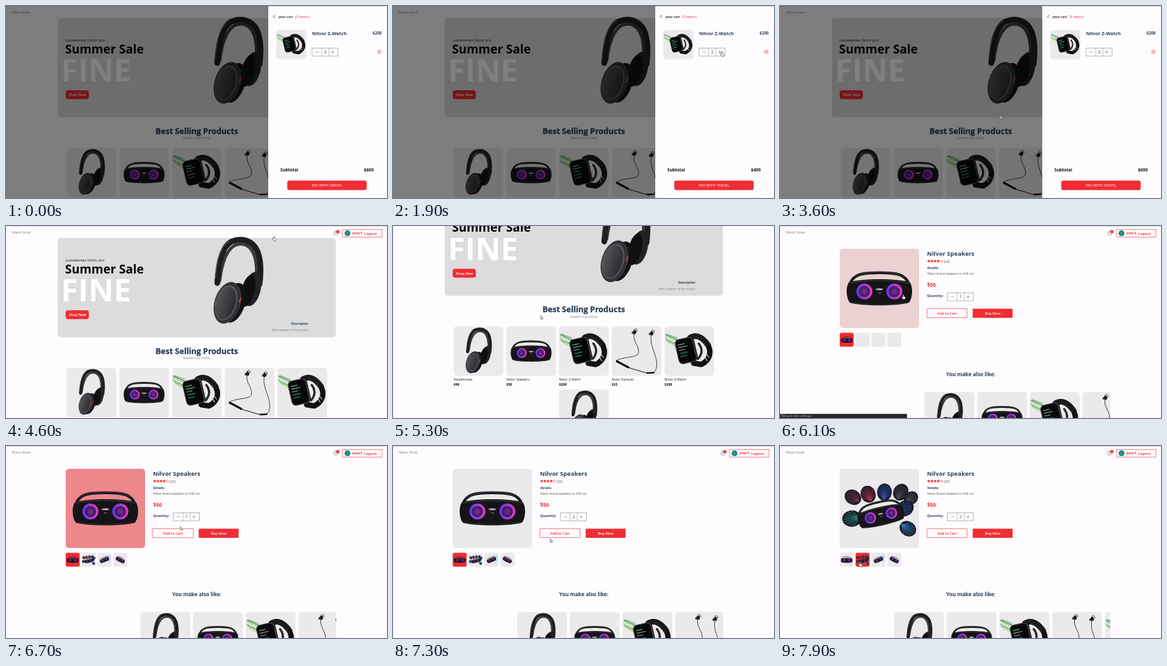
These frames come from a looping animation (600x303 px, 8000 ms). An HTML page:

```html
<!DOCTYPE html>
<html lang="en">
<head>
<meta charset="utf-8">
<title>Shop walkthrough</title>
<style>
html, body { margin: 0; width: 100%; height: 100%; overflow: hidden; background: #fefcfe; }
svg { display: block; width: 100vw; height: 100vh; font-family: "Open Sans", "Noto Sans", sans-serif; }
</style>
</head>
<body>
<svg id="stage" viewBox="0 0 600 303"></svg>
<script>
const LOOP = 8000;
const RED = '#f02d34', NAVY = '#2b4159', CARD = '#ebe9eb', PAGE = '#fefcfe';
const BRAND = 'Nilvor';

// ---- markup helpers ----
const text = (x, y, size, str, o = {}) =>
  `<text x="${x}" y="${y}" font-size="${size}" fill="${o.fill || '#111'}" font-weight="${o.w || 400}"` +
  ` text-anchor="${o.a || 'start'}"${o.id ? ` id="${o.id}"` : ''} ${o.extra || ''}>${str}</text>`;
const rect = (x, y, w, h, r, fill, extra = '') =>
  `<rect x="${x}" y="${y}" width="${w}" height="${h}" rx="${r}" fill="${fill}" ${extra}/>`;
const line = (d, stroke, w, extra = '') =>
  `<path d="${d}" fill="none" stroke="${stroke}" stroke-width="${w}" stroke-linecap="round" stroke-linejoin="round" ${extra}/>`;
const oval = (x, y, rx, ry, fill, extra = '') =>
  `<ellipse cx="${x}" cy="${y}" rx="${rx}" ry="${ry}" fill="${fill}" ${extra}/>`;
const leaning = (x, y, rx, ry, angle, fill) => oval(x, y, rx, ry, fill, `transform="rotate(${angle} ${x} ${y})"`);
const pic = (name, x, y, size, extra = '') =>
  `<use href="#${name}" x="${x}" y="${y}" width="${size}" height="${size}" ${extra}/>`;
const symbol = (id, body) => `<symbol id="${id}" viewBox="0 0 78 78">${body}</symbol>`;

// ---- product pictures, each on a 78 unit square ----
const headphones =
  line('M24 38C26 22 30 12 37 8.5C44 6 50 9 53 18C55 25 55 32 54 40', '#3b3b3f', 2.6) +
  line('M22 40C23 20 27 9 34 5.5C43 2 51 5 55 13C58 20 58.5 30 57 41', '#1e1e21', 4.8) +
  line('M20.4 36C21.5 20 25 9 32 5', '#5f5f64', .6) +
  leaning(51, 45, 7, 14.5, 13, '#232326') +
  leaning(47.5, 46.5, 5.5, 13.5, 14, '#0f0f11') +
  leaning(36, 56.5, 9, 17, 17, '#121214') +
  leaning(30.5, 56.5, 10.8, 17.8, 17, '#323236') +
  leaning(29.3, 56.5, 8.8, 15, 17, '#5a5a5f') +
  leaning(29, 56.7, 8, 14, 17, 'url(#cup)') +
  line('M40.5 56L41.4 52.5', '#d8423f', 1);

const ring = (x, y) =>
  oval(x, y, 8.2, 8.2, '#241436') +
  oval(x, y, 6.6, 6.6, 'none', 'stroke="url(#glow)" stroke-width="2.4"') +
  oval(x, y, 4.8, 4.8, '#4d1f70') + oval(x, y, 2.7, 2.7, '#6d2a8a');

const speakerBody =
  line('M10 35C13 25 22 23.5 39 23.5S65 25 68 35', '#1b1b1f', 2.8) +
  line('M15 27.5C21 24 28 22.8 39 22.8S57 24 63 27.5', '#4a4a50', .5) +
  '<path d="M9 33C20 29 58 29 69 33C72 37 72 48 68 53C58 56.5 20 56.5 10 53C6 48 6 37 9 33Z" fill="#151518"/>' +
  line('M10 33.8C22 30.5 56 30.5 68 33.8', '#44444a', .7) +
  line('M12 52.6C24 55.4 54 55.4 66 52.6', '#34343a', .6) +
  ring(24.3, 42) + ring(53.7, 42) +
  oval(39, 39.8, 3.8, 1, '#b0b0b5') + rect(37.5, 43, 3, .8, .3, '#77777c');

const watch =
  ['M2 13L20 21', 'M2 16L19 23', 'M1 19L18 27', 'M3 22L19 29', 'M4 12L20 18', 'M6 25L18 32']
    .map((d, i) => line(d, i % 2 ? '#72c044' : '#2b8a3c', i % 3 ? .8 : 1.4, `stroke-dasharray="${4 + i} 1.2"`)).join('') +
  line('M40 18C50 11 61 18 69 30', '#1a1a1d', 9) +
  line('M48 17C57 17 63 25 68 33', '#37373c', .8) +
  line('M70 33C74 43 70 54 58 60L46 58', '#121214', 8.5) +
  line('M54 27C60 35 60 43 53 51', '#29292d', 3.5) +
  '<g transform="rotate(-13 34 38)">' +
  rect(19, 18, 31, 40, 7, '#232327') + rect(19.6, 18.6, 28, 38.8, 6.5, '#08080a', 'stroke="#77777d" stroke-width=".6"') +
  rect(23, 26, 11, 1.5, .5, '#41a861') + rect(23, 30.5, 15, 1.1, .5, '#9aa59d') +
  rect(23, 35, 10, 1.1, .5, '#9aa59d') + rect(23, 39.5, 13, 2.4, 1, '#19613a') + rect(23, 45, 11, 1.2, .5, '#41a861') +
  '</g>' + line('M64 49L67 54M67 45L70 49', '#dadadd', 1.2);

const bud = (x, y) =>
  oval(x, y, 2.6, 3.2, '#17171a') + oval(x - 3, y + 1, 1.7, 2, '#36363b') +
  line(`M${x - 1} ${y - 2}C${x - 1} ${y - 7} ${x + 5} ${y - 6} ${x + 4} ${y - 1}`, '#222226', .9);
const earbuds =
  line('M35 12C33 24 44 31 42 42C40 50 18 47 7 54', '#26262a', .9) +
  line('M62 14C60 28 66 36 69 48C72 60 72 67 66 73', '#26262a', .9) +
  line('M7 54C17 57 20 63 32 67C46 70 56 76 66 73', '#1a1a1d', 1.1) +
  line('M8 55L26 64.5', '#151518', 3.2) + line('M56 73.5L66 73', '#151518', 2.6) +
  bud(36, 9) + bud(63, 11);

const wing = (x, y, r, angle, color) => {
  let ribs = '';
  for (let i = -4; i <= 4; i++) {
    const a = i * .29;
    ribs += line(`M0 ${r * .85}L${(Math.sin(a) * r * .9).toFixed(1)} ${(r * .6 - Math.cos(a) * r * 1.4).toFixed(1)}`,
      color, .6, 'stroke-dasharray="1.5 .6"');
  }
  return `<g transform="translate(${x} ${y}) rotate(${angle})">${oval(0, 0, r * .85, r, '#1b1b25')}${ribs}</g>`;
};
const party =
  wing(70, 29, 7.5, 50, '#55555f') + wing(60, 23, 8.5, 28, '#4b4b58') +
  wing(13, 28, 8.5, -55, '#7c3151') + wing(28, 25, 8.5, -22, '#bd3152') +
  wing(44, 23, 8.5, 3, '#3458c8') + wing(64, 39, 9, 60, '#2f54b0') +
  wing(12, 49, 9.5, -95, '#27998f') + wing(67, 59, 8.5, 125, '#3185c7') +
  '<g transform="translate(40.5 46) rotate(-13) scale(.72) translate(-39 -42)">' + speakerBody + '</g>';
const tilted = angle =>
  `<g transform="rotate(${angle} 39 40) translate(7 6) scale(.82)">${speakerBody}</g>`;
const smoke = oval(60, 24, 13, 8, '#9dcbe4') + oval(65, 38, 8, 12, '#b8d9eb') + tilted(-22);

// ---- shared interface parts ----
const qtyBox = (x, y, id) =>
  rect(x, y, 41, 12.5, 0, 'none', 'stroke="#85858b" stroke-width=".6"') +
  line(`M${x + 15} ${y}v12.5M${x + 26.5} ${y}v12.5`, '#85858b', .5) +
  line(`M${x + 6} ${y + 6.2}h4`, '#777', .6) +
  line(`M${x + 30.5} ${y + 6.2}h4M${x + 32.5} ${y + 4.2}v4`, '#777', .6) +
  text(x + 20.7, y + 8.6, 6.2, '1', { a: 'middle', fill: '#444', id });
const topLine = (x, w) => rect(x, 0, w, .8, 0, '#cfcdcf');
const header =
  topLine(0, 600) + text(9, 11.5, 5.4, BRAND + ' Store', { fill: '#777' }) +
  rect(516.7, 9.5, 5, 4.5, .6, 'none', 'stroke="#666" stroke-width=".6"') + line('M518 9.5V8q1.2-1.6 2.4 0v1.5', '#666', .5) +
  oval(522.7, 9, 2.7, 2.7, RED) + text(522.7, 10.5, 4, '3', { a: 'middle', fill: '#fff' }) +
  rect(530, 5.3, 62, 12, 0, PAGE, `stroke="${RED}" stroke-width=".6"`) +
  oval(537.8, 11.4, 4.6, 4.6, '#138a80') + text(537.8, 13.2, 4.6, 'J', { a: 'middle', fill: '#fff' }) +
  text(545.5, 13, 4.4, 'Jonas E', { fill: RED, w: 700 }) +
  text(564, 13.8, 6, 'Logout', { fill: RED, w: 600 });

const goods = [
  ['headphones', 'Headphones', 99], ['speaker', BRAND + ' Speakers', 50], ['watch', BRAND + ' Z-Watch', 200],
  ['earbuds', BRAND + ' Earbuds', 33], ['watch', BRAND + ' Z-Watch', 200]];
const tile = (name, x, y) => rect(x, y, 78.3, 78, 5, CARD) + pic(name, x, y, 78);
const product = ([name, label, price], x, y, id = '') =>
  `<g ${id && `id="${id}"`}>` + tile(name, x, y) +
  text(x, y + 85, 5, label, { fill: '#222' }) + text(x, y + 93.5, 5.2, '$' + price, { w: 700, fill: '#000' }) + '</g>';

const home =
  header +
  rect(81.5, 19, 438, 156.5, 5, '#dcdcdc') +
  text(93.5, 55.5, 5.9, 'Lumetteries Ostric pro') +
  text(93, 74.5, 19, 'Summer Sale', { w: 700, fill: '#000' }) +
  text(86.6, 119, 49, 'FINE', { w: 700, fill: '#fff' }) +
  rect(94, 133, 36.5, 14, 4, RED) + text(112.3, 142, 5.6, 'Shop Now', { a: 'middle', w: 600, fill: '#fff' }) +
  pic('headphones', 291, 14, 148) +
  text(476, 156, 4.7, 'Description', { a: 'end', w: 700, fill: NAVY }) +
  text(476, 166, 4.6, 'Best headset on the market', { a: 'end', w: 300, fill: '#555' }) +
  text(300.5, 201.5, 12.5, 'Best Selling Products', { a: 'middle', w: 700, fill: NAVY, extra: `stroke="${NAVY}" stroke-width=".3"` }) +
  text(300.5, 210.3, 4.6, 'Speakers high fidelity', { a: 'middle', w: 300, fill: '#555' }) +
  goods.map((g, i) => product(g, 95.5 + 83 * i, 224, i === 1 ? 'picked' : '')).join('') +
  product(goods[0], 261.5, 323.5);

const cart =
  rect(0, 0, 413, 303, 0, '#000', 'opacity=".5"') + rect(413, 0, 187, 303, 0, PAGE) + topLine(413, 187) +
  line('M423.2 14.4L421.2 16.5L423.2 18.6', '#222', .8) +
  text(429, 18.5, 5.2, 'your cart', { w: 600 }) +
  text(455.5, 18.5, 5.6, '', { fill: RED, id: 'items' }) +
  rect(425.5, 37.5, 47.5, 47, 5, CARD) + pic('watch', 425.8, 37.5, 47) +
  text(482, 45.7, 7.4, BRAND + ' Z-Watch', { w: 700, fill: NAVY }) +
  text(591.7, 44.5, 6.3, '$200', { a: 'end', w: 700, fill: NAVY }) +
  qtyBox(482, 66.5, 'cartQty') +
  oval(588, 72.2, 2.7, 2.7, 'none', `stroke="${RED}" stroke-width=".7"`) +
  line('M587.1 71.3l1.8 1.8m0-1.8l-1.8 1.8', RED, .5) +
  text(432, 261, 6.6, 'Subtotal', { w: 700 }) +
  text(579, 261, 6.7, '', { a: 'end', w: 700, id: 'total' }) +
  rect(443, 275.5, 125, 15, 3, RED) +
  text(505.7, 285.3, 6, 'PAY WITH TARVEL', { a: 'middle', fill: '#fff' });

const star = index => {
  let d = '';
  for (let i = 0; i < 10; i++) {
    const r = i % 2 ? 1.1 : 2.3, a = i * Math.PI / 5;
    d += `${i ? 'L' : 'M'}${(234.2 + 5 * index + r * Math.sin(a)).toFixed(2)} ${(55.5 - r * Math.cos(a)).toFixed(2)}`;
  }
  return `<path d="${d}Z" fill="${index < 4 ? RED : 'none'}" stroke="${RED}" stroke-width=".4"/>`;
};
const shots = ['speaker', 'party', 'smoke', 'tilted'];
const detail =
  header +
  rect(94, 36, 125, 125, 5, CARD, 'id="mainBg"') + '<use id="mainPic" x="94" y="36" width="125" height="125"/>' +
  shots.map((s, i) => rect(94 + 25 * i, 168.5, 22, 22, 3, CARD, `id="thumb${i}"`) +
    pic(s, 94 + 25 * i, 168.5, 22, i ? 'class="late"' : '')).join('') +
  text(231.5, 47, 9.5, BRAND + ' Speakers', { w: 700, fill: NAVY }) +
  [0, 1, 2, 3, 4].map(star).join('') +
  text(258, 57.7, 5.2, '(20)', { fill: '#555' }) +
  text(232, 67.5, 4.8, 'Details:', { w: 700, fill: NAVY }) +
  text(232, 77, 4.75, BRAND + ' brand speakers to chill out', { fill: '#555' }) +
  text(231.7, 96.3, 8, '$50', { w: 700, fill: RED }) +
  text(231.7, 112, 5.4, 'Quantity:', { w: 700, fill: NAVY }) +
  qtyBox(263.7, 105.5, 'pageQty') +
  '<g id="addBtn">' + rect(231.7, 130.7, 62.6, 14, 0, PAGE, `stroke="${RED}" stroke-width=".6"`) +
  text(263, 139.8, 5.6, 'Add to Cart', { a: 'middle', w: 600, fill: RED }) + '</g>' +
  rect(303.5, 130.5, 62.8, 14.4, 0, RED) + text(335, 139.8, 5.6, 'Buy Now', { a: 'middle', w: 600, fill: '#fff' }) +
  text(300.5, 237, 8.15, 'You make also like:', { a: 'middle', w: 700, fill: NAVY }) +
  '<g clip-path="url(#lane)"><g id="marquee">' + goods.map(([n], i) => tile(n, 83 * i, 262)).join('') + '</g></g>' +
  '<g id="status">' + rect(0, 296.5, 200, 6.5, 0, '#25262a') +
  text(2, 301.2, 3.6, `Waiting for ${BRAND.toLowerCase()}.netlify.app...`, { fill: '#ddd' }) + '</g>';

const gradient = (id, from, to) =>
  `<linearGradient id="${id}"><stop stop-color="${from}"/><stop offset="1" stop-color="${to}"/></linearGradient>`;
const $ = id => document.getElementById(id);
$('stage').innerHTML =
  '<defs>' + gradient('glow', '#6a38ef', '#e23ac2') + gradient('cup', '#525257', '#2c2c30') +
  '<clipPath id="lane"><rect x="81" y="250" width="439" height="60"/></clipPath>' +
  symbol('headphones', headphones) + symbol('speaker', speakerBody) + symbol('watch', watch) +
  symbol('earbuds', earbuds) + symbol('party', party) + symbol('smoke', smoke) + symbol('tilted', tilted(28)) + '</defs>' +
  rect(0, 0, 600, 303, 0, PAGE) +
  `<g id="home">${home}</g><g id="cart">${cart}</g><g id="detail">${detail}</g>` +
  '<g id="cursor" fill="#fff" stroke="#26262a" stroke-width=".55" stroke-linejoin="round">' +
  '<path id="arrow" d="M0 0V5.4L1.3 4.3L2.1 6.1L3 5.7L2.2 4H3.8Z"/>' +
  '<path id="hand" d="M0 0q.8 0 .8.8v2.4l2 .5q.7.2.6 1l-.4 2.9h-3.4l-2.1-3.1q-.3-.9.6-.7l1.1.9v-3.9q0-.8.8-.8z"/></g>';

// ---- timeline ----
const track = (keys, t, k = 1) => {
  if (t <= keys[0][0]) return keys[0][k];
  for (let i = 1; i < keys.length; i++) {
    const a = keys[i - 1], b = keys[i];
    if (t < b[0]) {
      const p = (t - a[0]) / (b[0] - a[0]);
      return a[k] + (b[k] - a[k]) * p * p * (3 - 2 * p);
    }
  }
  return keys[keys.length - 1][k];
};
const stepAt = (keys, t) => keys.filter(k => k[0] <= t).pop()[1];

const pointer = [
  [100, 604, 130], [700, 490, 71], [1250, 490, 71], [1600, 517, 72], [1900, 518, 71.5], [2150, 518, 71.5],
  [2600, 508, 279], [2800, 506, 279], [3400, 347, 173], [3700, 347, 173], [4300, 422, 16], [4650, 422, 16],
  [5200, 232.5, 141.5], [5350, 232.5, 141.5], [5700, 194, 108], [6350, 194, 108], [6650, 274.5, 127],
  [6720, 274.5, 127], [6950, 296, 111], [7150, 296, 111], [7400, 222, 165], [7700, 126, 183], [8000, 126, 183]];
const handOn = [[0, 0], [650, 1], [2200, 0], [2500, 1], [2800, 0], [4250, 1], [4650, 0], [5500, 1],
  [6450, 0], [6900, 1], [7180, 0], [7580, 1]];
const cartCount = [[0, 3], [800, 2], [1200, 1], [1700, 2], [2100, 3]];
const scroll = [[4900, 0], [5200, 65.5], [5400, 65.5], [5600, 131]];
const hoverTint = [[5980, 0], [6100, .13], [6450, 1], [6560, 1], [6850, 0]];
const CART_SHUT = 4600, OPEN_DETAIL = 5900, SHOTS_READY = 6400, QTY_UP = 7050, NEXT_SHOT = 7600;

const show = (el, on) => el.setAttribute('display', on ? 'inline' : 'none');
const zoom = (id, x, y, s) => $(id).setAttribute('transform', `translate(${x} ${y}) scale(${s}) translate(${-x} ${-y})`);
const mix = (a, b, p) => `rgb(${a.map((v, i) => Math.round(v + (b[i] - v) * p))})`;

function draw(t) {
  const onDetail = t >= OPEN_DETAIL, ready = t >= SHOTS_READY;
  show($('home'), !onDetail);
  show($('cart'), t < CART_SHUT);
  show($('detail'), onDetail);
  $('home').setAttribute('transform', `translate(0 ${-track(scroll, t)})`);
  zoom('picked', 217.6, 270, track([[5600, 1], [5850, 1.08]], t));

  const count = stepAt(cartCount, t);
  $('items').textContent = `(${count} items)`;
  $('cartQty').textContent = count;
  $('total').textContent = '$' + count * 200;

  const shot = t < NEXT_SHOT ? 0 : 1;
  $('mainPic').setAttribute('href', '#' + shots[shot]);
  $('mainBg').setAttribute('fill', mix([235, 233, 235], [240, 45, 52], track(hoverTint, t)));
  shots.forEach((s, i) => $('thumb' + i).setAttribute('fill', i === shot ? RED : CARD));
  document.querySelectorAll('.late').forEach(el => show(el, ready));
  $('pageQty').textContent = t < QTY_UP ? 1 : 2;
  zoom('addBtn', 263, 137.7, track([[6600, 1], [6700, 1.023], [6850, 1]], t));
  $('marquee').setAttribute('transform', `translate(${227.7 - (t - 6100) * 0.02667} 0)`);
  show($('status'), !ready);

  const hand = stepAt(handOn, t);
  show($('cursor'), t > 100);
  show($('hand'), hand);
  show($('arrow'), !hand);
  $('cursor').setAttribute('transform', `translate(${track(pointer, t)} ${track(pointer, t, 2)})`);
}

const start = performance.now();
function tick() {
  draw((performance.now() - start) % LOOP);
  requestAnimationFrame(tick);
}
tick();
</script>
</body>
</html>
```
